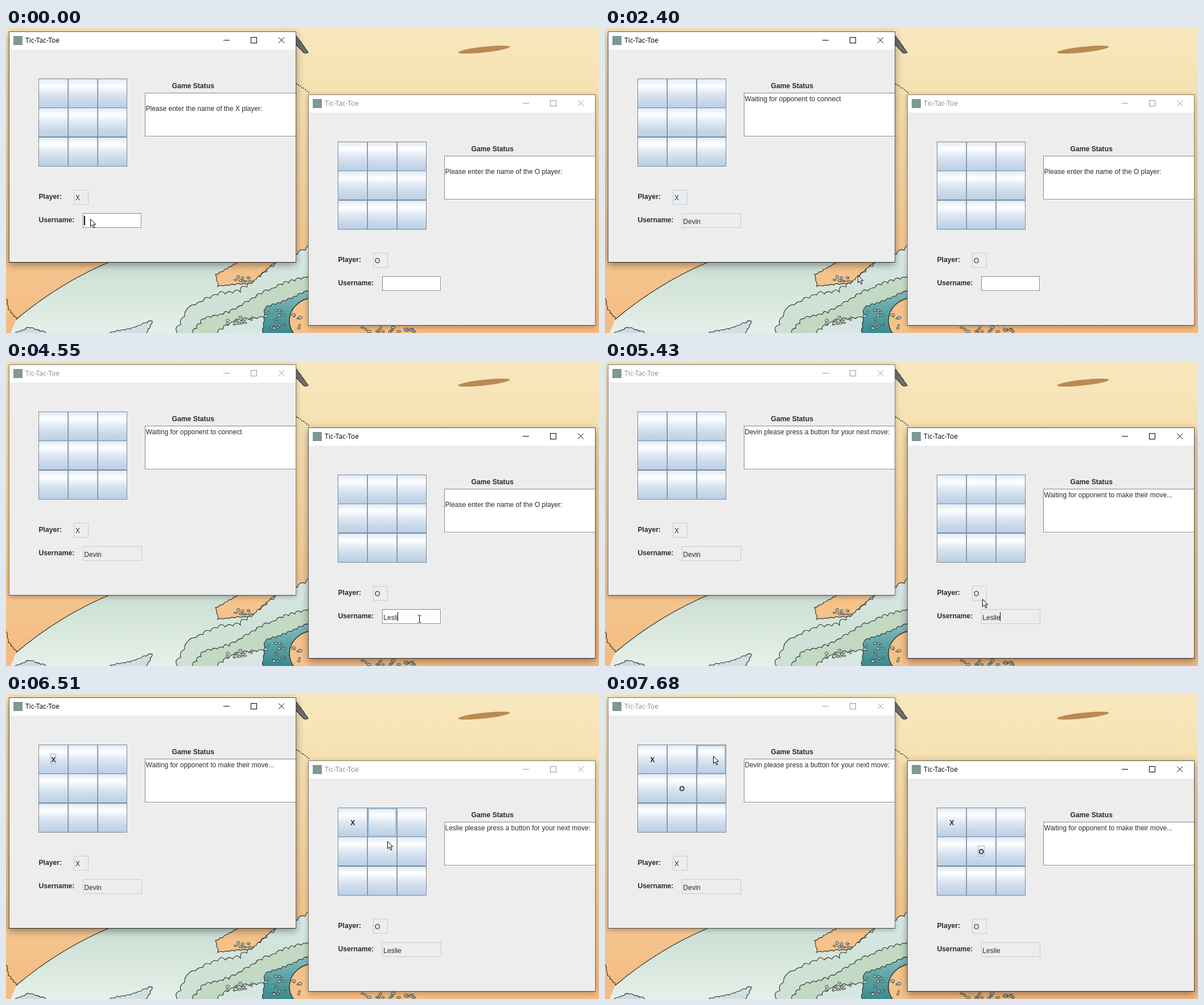
An HTML page with a canvas for the animation above (8 s loop, 1042 px wide and 537 px high).

```html
<!DOCTYPE html>
<html lang="en">
<head>
<meta charset="utf-8">
<title>Tic-Tac-Toe</title>
<style>
html, body { margin: 0; width: 100%; height: 100%; overflow: hidden; background: #f5dfae; }
canvas { display: block; width: 1042px; height: 537px; }
</style>
</head>
<body>
<canvas id="stage" width="1042" height="537"></canvas>
<script>
const W = 1042, H = 537, LOOP = 8000;
const SANS = '"Liberation Sans", Arial, sans-serif';
const PLAIN = '12px ' + SANS, BOLD = 'bold 12.2px ' + SANS;
const TITLE = '12px "Open Sans", "Noto Sans", sans-serif';
const STEEL = '#7a8a99', PALE = '#b8cfe5', INK = '#2b2b2b', PANEL = '#ededed';
const NAME_X = 'Devin', NAME_O = 'Leslie';
const WAIT = 'Waiting for opponent to make their move...';
const ctx = document.getElementById('stage').getContext('2d');

// ---------- drawing helpers ----------
function text(s, x, y, font, color, align = 'left') {
  ctx.font = font;
  ctx.fillStyle = color;
  ctx.textAlign = align;
  ctx.fillText(s, x, y);
}

function rect(c, x, y, w, h, fill, stroke) {
  if (fill) { c.fillStyle = fill; c.fillRect(x, y, w, h); }
  if (stroke) { c.strokeStyle = stroke; c.lineWidth = 1; c.strokeRect(x + .5, y + .5, w - 1, h - 1); }
}

function fade(c, y0, y1, colors) {
  const g = c.createLinearGradient(0, y0, 0, y1);
  colors.forEach((color, i) => g.addColorStop(i / (colors.length - 1), color));
  return g;
}

function seeded(seed) {
  return () => (seed = seed * 16807 % 2147483647) / 2147483647;
}

// ---------- desktop ----------
function paintDesktop(c) {
  const rnd = seeded(11), line = '#2b2d28', sand = '#f4c28a';

  // scalloped outline through a few points; the fill drops to the bottom edge
  function edge(points, size, fill, dropX) {
    const path = new Path2D();
    path.moveTo(...points[0]);
    points.slice(1).forEach(([x1, y1], i) => {
      const [x0, y0] = points[i], dx = x1 - x0, dy = y1 - y0, len = Math.hypot(dx, dy);
      const n = Math.ceil(len / (8 + size));
      for (let k = 1; k <= n; k++) {
        const m = (k - .5) / n, out = size * (.5 + rnd()) / len;
        path.quadraticCurveTo(x0 + dx * m + dy * out, y0 + dy * m - dx * out, x0 + dx * k / n, y0 + dy * k / n);
      }
    });
    if (fill) {
      const area = new Path2D(path);
      if (dropX) { area.lineTo(dropX, H); area.lineTo(points[0][0], H); }
      c.fillStyle = fill;
      c.fill(area);
    }
    c.strokeStyle = line;
    c.lineWidth = 1.1;
    c.stroke(path);
  }

  function oval(x, y, rx, ry, fill, outline, turn = 0) {
    c.beginPath();
    c.ellipse(x, y, rx, ry, turn, 0, 7);
    c.fillStyle = fill;
    c.fill();
    if (outline) { c.strokeStyle = line; c.lineWidth = outline; c.stroke(); }
  }

  function pebbles(n, x, y, w, h, color) {
    for (let i = 0; i < n; i++)
      oval(x + rnd() * w, y + rnd() * h, 1.5 + rnd() * 2.2, 1.2 + rnd() * 1.5, color, .9);
  }

  rect(c, 0, 0, W, H, fade(c, 0, H, ['#f8e8be', '#f6dfae', '#f5d3a0', '#f4c690', '#f4bb82']));
  oval(840, 38, 46, 5, '#b98a52', 0, -.11);
  edge([[510, 14], [531, 43], [524, 44], [509, 28]], 1, '#70706f');
  c.fillStyle = line;
  for (let i = 0; i < 8; i++) c.fillRect(510 + i * 3, 97 + i * 2 + rnd() * 2, 2, 1.5);
  pebbles(20, 622, 527, 95, 9, '#b9cbc9');

  c.save();
  c.beginPath();
  c.rect(0, 0, 533, H);
  c.clip();

  const slope = new Path2D('M186 410 Q95 448 18 513');
  const hill = new Path2D(slope);
  hill.lineTo(8, H);
  hill.lineTo(480, H);
  hill.lineTo(480, 410);
  c.fillStyle = fade(c, 410, H, ['#cbded4', '#d8e7de', '#e6f0ea']);
  c.fill(hill);
  c.strokeStyle = line;
  c.lineWidth = 1.2;
  c.stroke(slope);
  edge([[0, 476], [4, 496], [18, 513]], 3);
  edge([[16, H], [42, 528], [70, H]], 3, '#c9dbe2');
  edge([[182, H], [218, 530], [257, 516], [246, H]], 3, '#cfe0e2');

  edge([[301, H], [320, 493], [372, 470], [412, 465], [470, 420], [540, 384]], 8,
    fade(c, 390, H, ['#dcebec', '#cfe2d8', '#cfe1d6']), 540);
  edge([[478, 408], [408, 411], [368, 434], [372, 455], [432, 450], [478, 408]], 3, sand);
  pebbles(9, 403, 434, 30, 12, '#bccdc8');

  edge([[328, H], [350, 512], [392, 502], [450, 468], [486, 452], [540, 436]], 6, '#c2d9c3', 540);
  edge([[372, H], [400, 517], [454, 510]], 6, '#d6e6e2', 454);
  edge([[452, H], [456, 493], [492, 481], [540, 459]], 4, fade(c, 460, H, ['#8dbfbd', '#5ca3a6', '#398b91']), 540);
  oval(542, 515, 44, 40, sand, 1.3);
  pebbles(16, 456, 497, 36, 32, '#b6cfcc');
  pebbles(14, 385, 508, 50, 15, '#d2e0d8');
  pebbles(6, 505, 502, 12, 33, '#c6cdbf');
  c.restore();
}

const desktop = document.createElement('canvas');
desktop.width = W;
desktop.height = H;
paintDesktop(desktop.getContext('2d'));

// ---------- game window ----------
function drawFrame(active, dull) {
  ctx.save();
  ctx.shadowColor = active ? 'rgba(0,0,0,.4)' : 'rgba(0,0,0,.3)';
  ctx.shadowBlur = active ? 13 : 9;
  ctx.shadowOffsetY = active ? 4 : 2;
  rect(ctx, 5, 6, 505, 407, PANEL);
  ctx.restore();
  rect(ctx, 5, 6, 505, 32, '#ffffff');
  rect(ctx, 5, 6, 505, 407, null, active ? '#5c5a54' : '#857d6e');
  rect(ctx, 5, 412, 505, 1, active ? '#2a2a2a' : '#4b4b4b');
  rect(ctx, 13, 14, 16, 16, '#7f9796');
  text('Tic-Tac-Toe', 34, 26, TITLE, active ? '#000000' : dull);

  ctx.strokeStyle = active ? '#000000' : '#989898';
  ctx.lineWidth = 1;
  ctx.strokeRect(430.5, 16.5, 10, 10);
  ctx.stroke(new Path2D('M382 21.5h11M479 16.5l10 10m0-10l-10 10'));
}

function drawCell(i, mark, hover, focus) {
  const size = 52, x = 57 + i % 3 * size, y = Math.floor(89 + Math.floor(i / 3) * 51.5);
  const mid = '#dde8f3';
  rect(ctx, x, y, size, size, fade(ctx, y, y + size, [mid, '#ffffff', mid, '#cad9ea', PALE]), STEEL);
  rect(ctx, x + size - 1, y + 1, 1, size - 2, i % 3 < 2 ? '#a3b1be' : STEEL);
  if (hover) {
    ctx.strokeStyle = '#a9c3dc';
    ctx.lineWidth = 2;
    ctx.strokeRect(x + 2, y + 2, size - 4, size - 4);
  }
  if (!mark) return;
  const cx = x + 26.3, cy = y + 30.5, half = mark === 'X' ? 5 : 6;
  if (focus) rect(ctx, Math.round(cx) - half, Math.round(cy) - 15, half * 2, 19, null, '#a3b8cc');
  text(mark, cx, cy, BOLD, INK, 'center');
}

function drawField(s, editable, caret) {
  if (editable) {
    rect(ctx, 135, 326, 104, 27, '#ffffff');
    rect(ctx, 135, 326, 103, 26, null, STEEL);
  } else {
    rect(ctx, 135, 326, 104, 26, PANEL, PALE);
  }
  text(s, 137.3, 345, PLAIN, INK);
  if (caret) rect(ctx, 137 + Math.round(ctx.measureText(s).width), 331, s ? 1 : 2, 16, '#111111');
}

function drawWindow(w) {
  ctx.save();
  ctx.translate(w.dx, w.dy);
  drawFrame(w.active, w.dull);
  for (let i = 0; i < 9; i++) drawCell(i, w.marks[i], w.hover === i, w.focus === i);
  text('Game Status', 291.4, 106, BOLD, INK);
  rect(ctx, 244, 114, 265, 78, '#ffffff');
  rect(ctx, 244, 114, 265, 1, STEEL);
  rect(ctx, 244, 114, 1, 77, STEEL);
  rect(ctx, 244, 190, 265, 1, STEEL);
  text(w.status, 245.5, w.asking ? 146 : 129, PLAIN, INK);
  text('Player:', 57.4, 301, BOLD, INK);
  rect(ctx, 119, 285, 26, 26, null, PALE);
  text(w.side, 122, 303, PLAIN, INK);
  text('Username:', 57.4, 342, BOLD, INK);
  drawField(w.name, w.asking, w.caret);
  ctx.restore();
}

// ---------- pointer ----------
const within = (t, a, b) => t >= a && t < b;
const smooth = u => u * u * (3 - 2 * u);
const settle = u => 1 - (1 - u) ** 3;

// each leg bends from the previous rest point, past a control point, to the next
const REST = [148, 336];
const LEGS = [
  { from: 2050, to: 2850, bend: [560, 500], end: [726, 454], ease: smooth },
  { from: 5310, to: 5940, bend: [400, 270], end: [60, 106], ease: smooth },
  { from: 6140, to: 6700, bend: [660, 60], end: [672, 275], ease: settle },
  { from: 7000, to: 7680, bend: [400, 130], end: [190, 109], ease: smooth }
];

function pointerAt(t) {
  let at = REST;
  for (const leg of LEGS) {
    if (t < leg.from) break;
    const u = leg.ease(Math.min(1, (t - leg.from) / (leg.to - leg.from))), v = 1 - u;
    at = at.map((p, i) => v * v * p + 2 * u * v * leg.bend[i] + u * u * leg.end[i]);
  }
  return at.map(Math.round);
}

const ARROW = new Path2D('M0 0V13L3 10L5.5 15.5L7.5 14.5L5.2 9.3H9.2Z');
const BEAM = new Path2D('M-3-7h2l1 1l1-1h2M0-6V5M-3 6h2l1-1l1 1h2');

function drawPointer(t) {
  const [x, y] = pointerAt(t);
  ctx.save();
  ctx.translate(x + .5, y + .5);
  if ([2900, 6070, 6930].some(click => within(t, click, click + 110))) {
    ctx.beginPath();
    ctx.arc(-2, -1, 12.5, 0, 7);
    ctx.fillStyle = 'rgba(255,250,60,.72)';
    ctx.fill();
  }
  const beam = within(t, 2800, 5400);
  ctx.lineWidth = 1;
  ctx.strokeStyle = '#000000';
  ctx.fillStyle = '#ffffff';
  if (!beam) ctx.fill(ARROW);
  ctx.stroke(beam ? BEAM : ARROW);
  ctx.restore();
}

// ---------- timeline ----------
const typed = (name, times, t) => name.slice(0, times.filter(at => t >= at).length);
const ask = side => 'Please enter the name of the ' + side + ' player:';
const prompt = name => name + ' please press a button for your next move:';

function render(t) {
  const leftActive = t < 2920 || within(t, 6070, 6930);
  const linked = t >= 5050, movedX = t >= 6110, movedO = t >= 6970;
  const turnX = linked && (!movedX || movedO);
  const marks = [];
  if (movedX) marks[0] = 'X';
  if (movedO) marks[4] = 'O';

  const left = {
    dx: 0, dy: 0, side: 'X', active: leftActive, dull: '#918d7c', marks,
    name: typed(NAME_X, [400, 710, 810, 1050, 1320], t),
    asking: t < 1660, caret: t < 1820,
    status: t < 1660 ? ask('X') : !linked ? 'Waiting for opponent to connect' : turnX ? prompt(NAME_X) : WAIT,
    hover: within(t, 5900, 6110) ? 0 : t >= 7620 ? 2 : -1,
    focus: leftActive && movedX ? 0 : -1
  };
  const right = {
    dx: 526, dy: 111, side: 'O', active: !leftActive, dull: '#7c917f', marks,
    name: typed(NAME_O, [3420, 3800, 4000, 4200, 4550, 4710], t),
    asking: !linked, caret: within(t, 2920, 6070),
    status: !linked ? ask('O') : turnX ? WAIT : prompt(NAME_O),
    hover: within(t, 6480, 6550) ? 1 : within(t, 6550, 6970) ? 4 : -1,
    focus: !leftActive && movedO ? 4 : -1
  };

  ctx.drawImage(desktop, 0, 0);
  (leftActive ? [right, left] : [left, right]).forEach(drawWindow);
  drawPointer(t);
}

const start = performance.now();
function tick() {
  render((performance.now() - start) % LOOP);
  requestAnimationFrame(tick);
}
tick();
</script>
</body>
</html>
```
